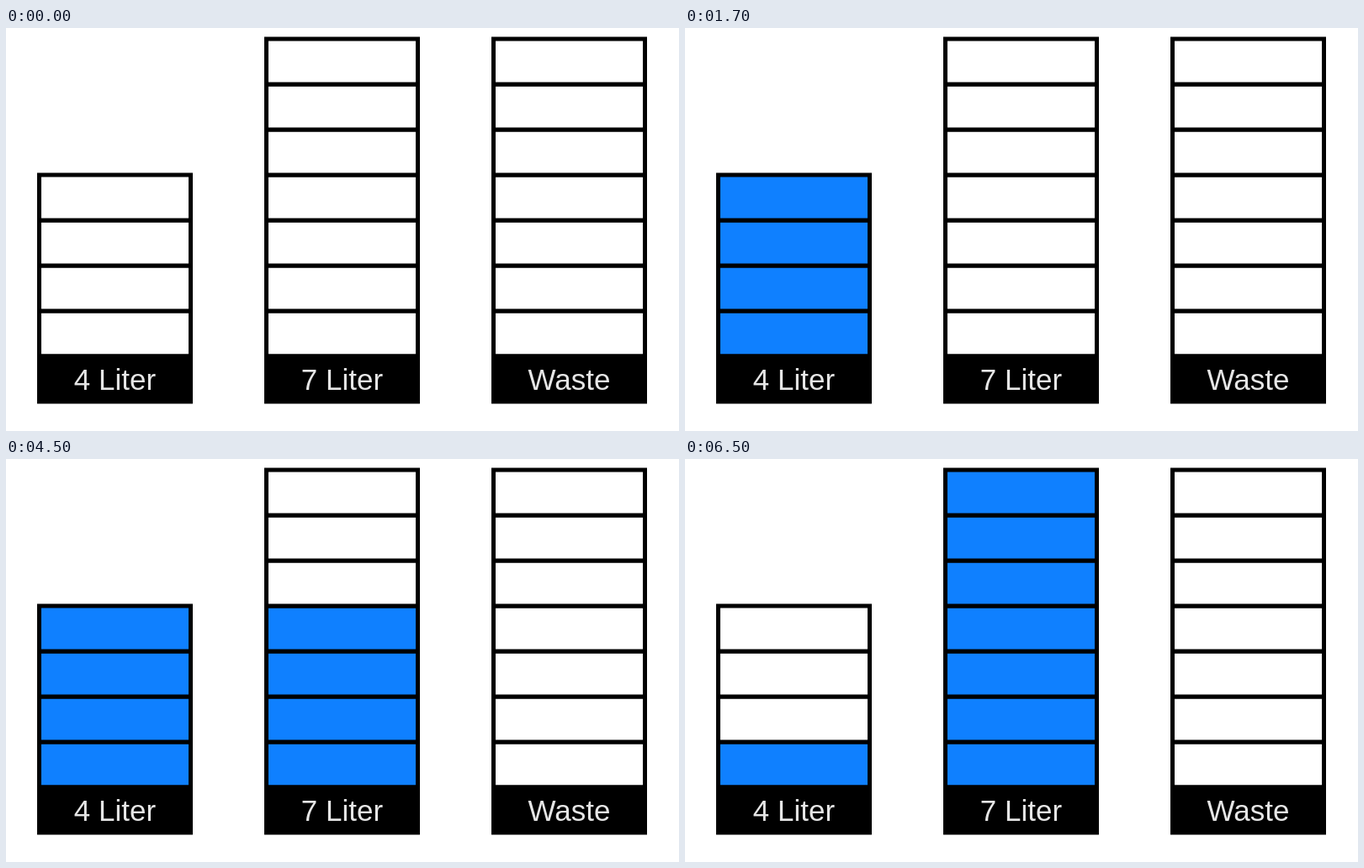
Recreate the animation shown at these times as an HTML page. Size 800 by 480 pixels, loop 8000 ms.

```html
<!DOCTYPE html>
<html lang="en">
<head>
<meta charset="utf-8">
<title>Water pouring puzzle</title>
<style>
  html, body { margin: 0; width: 100%; height: 100%; overflow: hidden; background: #fff; }
  svg { display: block; width: 800px; height: 480px; }
  rect { stroke: #000; stroke-width: 5; }
  text { font: 35px "Liberation Sans", Arial, sans-serif; fill: #e6e6e6; text-anchor: middle; }
</style>
</head>
<body>
<svg id="stage" viewBox="0 0 800 480"></svg>
<script>
const LOOP = 8000, WIDTH = 180, CELL = 54, BASE = 391;
const WATER = '#0f80ff', EMPTY = '#fff';
const stage = document.getElementById('stage');

function add(tag, attrs, text = '') {
  const el = document.createElementNS('http://www.w3.org/2000/svg', tag);
  for (const key in attrs) el.setAttribute(key, attrs[key]);
  el.textContent = text;
  stage.append(el);
  return el;
}

// Returns the cells from bottom to top.
function jug(x, size, label) {
  const box = { x, width: WIDTH, height: CELL };
  const cells = Array.from({ length: size }, (_, i) =>
    add('rect', { ...box, y: BASE - (i + 1) * CELL, fill: EMPTY }));
  add('rect', { ...box, y: BASE, fill: '#000' });
  add('text', { x: x + WIDTH / 2, y: 431 }, label);
  return cells;
}

const jugs = [jug(39.5, 4, '4 Liter'), jug(309.5, 7, '7 Liter'), jug(579.5, 7, 'Waste')];

// Liters in each jug from the given time on
const steps = [
  { at: 0, levels: [0, 0, 0] },
  { at: 500, levels: [4, 0, 0] },
  { at: 2500, levels: [0, 4, 0] },
  { at: 4500, levels: [4, 4, 0] },
  { at: 6500, levels: [1, 7, 0] }
];

function draw(time) {
  const { levels } = steps.findLast(step => step.at <= time);
  jugs.forEach((cells, j) => cells.forEach((cell, i) =>
    cell.setAttribute('fill', i < levels[j] ? WATER : EMPTY)));
}

const start = performance.now();
function tick() {
  draw((performance.now() - start) % LOOP);
  requestAnimationFrame(tick);
}
tick();
</script>
</body>
</html>
```
